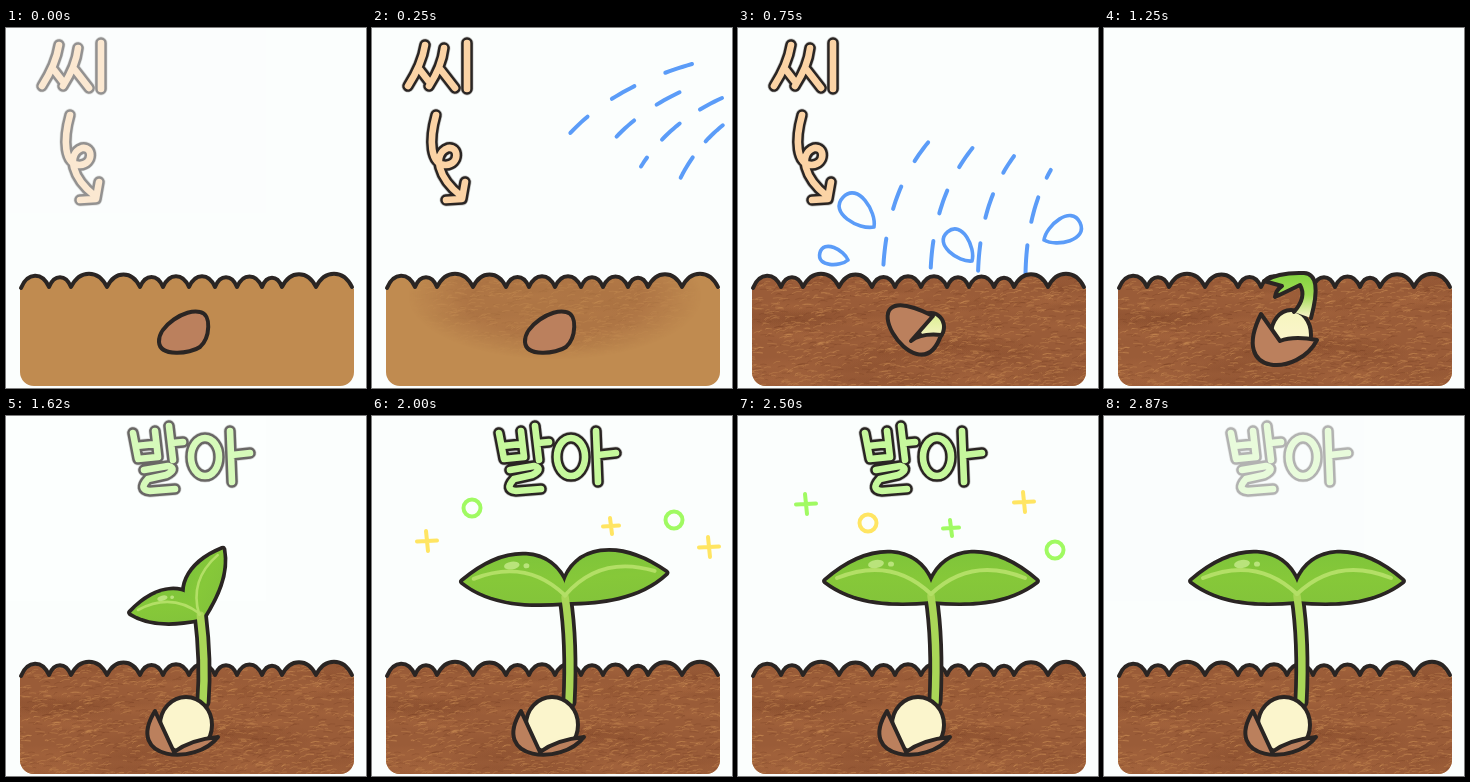
An HTML page with a canvas for the animation above (3 s loop, 360 px wide and 360 px high).

```html
<!DOCTYPE html>
<html lang="ko">
<head>
<meta charset="utf-8">
<title>씨 → 발아</title>
<style>
  html, body { margin: 0; width: 100%; height: 100%; overflow: hidden; background: #fbfefd; }
  canvas { display: block; width: 360px; height: 360px; }
</style>
</head>
<body>
<canvas id="stage" width="360" height="360" role="img" aria-label="씨, 발아"></canvas>
<script>
const INK = '#2a2523', PAPER = '#fbfefd', BLUE = '#5b9cf8', YELLOW = '#ffe562', LIME = '#a0fa62';
const LOOP = 3000, STEP = 125;
const ctx = document.getElementById('stage').getContext('2d');
ctx.lineCap = ctx.lineJoin = 'round';

const clamp = v => Math.max(0, Math.min(1, v));
const lerp = (a, b, k) => a + (b - a) * k;
const rad = degrees => degrees * Math.PI / 180;

function stroke(path, color, width) {
  ctx.strokeStyle = color;
  ctx.lineWidth = width;
  ctx.stroke(path);
}
function paint(path, fill, width = 4) {
  ctx.fillStyle = fill;
  ctx.fill(path);
  stroke(path, INK, width);
}
function vertical(y0, y1, ...colors) {
  const g = ctx.createLinearGradient(0, y0, 0, y1);
  colors.forEach((c, i) => g.addColorStop(i / (colors.length - 1), c));
  return g;
}

// Brush lettering
const seedWord = new Path2D('M53 17Q50 36 36 58M48 42L58 55M72 20Q70 38 57 58M69 42L83 60M95 15V61' +
  'M64 87C57 112 58 137 74 137C88 136 87 118 76 120C60 126 66 150 89 168M93 154L90 171L74 172');
const sproutWord = new Path2D('M127 17L132 43L152 41L149 15M130 30L150 28M163 10L167 44M166 27L177 26' +
  'M138 54L162 50Q172 53 160 59L142 63Q132 74 144 75L169 73' +
  'M213 41A14 19 0 1 1 185 41A14 19 0 1 1 213 41M224 15L226 66M226 39L244 37');

function lettering(path, fill, alpha) {
  if (alpha <= 0) return;
  stroke(path, 'rgba(42,37,35,.25)', 13);
  stroke(path, INK, 11.6);
  stroke(path, fill, 6.6);
  ctx.globalAlpha = 1 - alpha;
  ctx.fillStyle = PAPER;
  ctx.fillRect(0, 0, 260, 185);
  ctx.globalAlpha = 1;
}

// Ground: a row of bumps, the wider the higher
const ridge = new Path2D('M15 260');
let edge = 15;
for (const width of [28, 22, 36, 33, 23, 26, 26, 22, 25, 20, 34, 36]) {
  const top = 259 - (4 + .26 * width) / .75, inset = width * .24;
  ridge.bezierCurveTo(edge + inset, top, edge + width - inset, top, edge += width, 259);
}
const soil = new Path2D(ridge);
soil.lineTo(348, 261);
soil.arcTo(348, 358, 300, 358, 14);
soil.arcTo(14, 358, 14, 300, 14);
soil.lineTo(14, 261);

function layer() {
  const c = document.createElement('canvas');
  c.width = c.height = 360;
  return c.getContext('2d');
}

function makeTexture() {
  const g = layer();
  let seed = 7;
  const rnd = () => (seed = seed * 16807 % 2147483647) / 2147483647;
  g.fillStyle = '#9a5c38';
  g.fillRect(0, 0, 360, 360);
  for (let i = 0; i < 45; i++) {
    const r = 30 + rnd() * 40, glow = g.createRadialGradient(0, 0, 0, 0, 0, r);
    const tone = i % 2 ? '176,110,66' : '128,70,40';
    glow.addColorStop(0, `rgba(${tone},.3)`);
    glow.addColorStop(1, `rgba(${tone},0)`);
    g.setTransform(1, 0, 0, .16, rnd() * 360, 245 + rnd() * 115);
    g.fillStyle = glow;
    g.fillRect(-r, -r, 2 * r, 2 * r);
  }
  g.resetTransform();
  g.lineWidth = .9;
  for (let i = 0; i < 1700; i++) {
    const x = rnd() * 360, y = 245 + rnd() * 115, len = 3 + rnd() * 7, tilt = (rnd() - .7) * 4;
    g.strokeStyle = i % 3 ? 'rgba(205,143,87,.42)' : 'rgba(116,62,35,.3)';
    g.beginPath();
    g.moveTo(x, y);
    g.quadraticCurveTo(x + len / 2, y + tilt - 1, x + len, y + tilt);
    g.stroke();
  }
  return g.canvas;
}
const texture = makeTexture(), damp = layer();

// The texture seen through a soft ellipse that widens as water soaks in.
function soak(wet) {
  damp.globalCompositeOperation = 'copy';
  damp.drawImage(texture, 0, 0);
  damp.globalCompositeOperation = 'destination-in';
  const fade = damp.createRadialGradient(0, 0, 0, 0, 0, 1);
  const core = `rgba(0,0,0,${clamp(wet * 1.4)})`;
  fade.addColorStop(0, core);
  fade.addColorStop(.6, core);
  fade.addColorStop(1, 'rgba(0,0,0,0)');
  damp.setTransform(100 + 140 * wet, 0, 0, 30 + 100 * wet, 183, 268);
  damp.fillStyle = fade;
  damp.fillRect(-9, -9, 18, 18);
  damp.resetTransform();
  return damp.canvas;
}

function ground(wet) {
  ctx.fillStyle = '#c08b50';
  ctx.fill(soil);
  ctx.save();
  ctx.clip(soil);
  ctx.drawImage(wet < 1 ? soak(wet) : texture, 0, 0);
  ctx.restore();
  stroke(ridge, INK, 4);
}

// Water: four nested arcs of dashes flowing down to evenly spaced feet
function streamPoint(k, t) {
  const bend = (a, b, c) => lerp(lerp(a, b, t), lerp(b, c, t), t);
  return [bend(145 + 47.5 * k, 150 + 46.5 * k, 320 + 15 * k), bend(246, 85 + 17 * k, 36 + 17 * k)];
}

function stream(k, step) {
  const length = 306 - 38 * k, period = 58 - 3 * k;
  const head = clamp(1 - step / 4), tail = clamp(1 - (step - 5) * .44);
  const flow = 24.5 * (4 - step) % period;
  for (let s = flow - period; s < length + period; s += period) {
    const from = Math.max(head, s / length), to = Math.min(tail, (s + 26) / length);
    if (from >= to) continue;
    const dash = new Path2D();
    for (let j = 0; j <= 6; j++) dash.lineTo(...streamPoint(k, lerp(from, to, j / 6)));
    stroke(dash, BLUE, 4);
  }
}

const drops = [
  { x: 136, y: 203, lean: 52, size: 43, side: -1 },
  { x: 110, y: 236, lean: 22, size: 29, side: -1 },
  { x: 205, y: 236, lean: 50, size: 38, side: 1 },
  { x: 306, y: 216, lean: 34, size: 40, side: 1 }
];

function drop({ x, y, lean, size, side }) {
  const p = new Path2D('M0 0C.2 -.3 1 -.5 1 0C1 .5 .2 .3 0 0');
  ctx.save();
  ctx.translate(x, y);
  ctx.scale(side * size, size);
  ctx.rotate(rad(-lean));
  stroke(p, BLUE, 3.6 / size);
  ctx.restore();
}

function water(step) {
  if (step < 1 || step > 7) return;
  for (let k = 0; k < 4; k++) stream(k, step);
  if (step < 3 || step > 6) return;
  const second = step > 4;
  drops.forEach((d, i) => drop(second && i === 2
    ? { ...d, x: d.x + 29, y: d.y - 3, side: -1 }
    : { ...d, y: d.y - (second ? 4 : 0), lean: d.lean - (second ? 8 : 0) }));
}

// Seed poses: cracked, split, fallen apart.
// egg: centre and radii; shell: upper lip, mouth, lower lip and the two handles of its back.
const poses = [
  { egg: [193, 299, 13, 14], shell: [195, 288, 173, 313, 203, 307, 180, 375, 100, 240] },
  { egg: [187, 307, 20, 25], shell: [157, 286, 176, 313, 213, 312, 195, 348, 125, 350] },
  { egg: [180, 309, 26, 28], shell: [149, 295, 168, 336, 212, 321, 190, 350, 118, 345] }
];
const wholeSeed = new Path2D('M153 314C152 298 180 280 194 284C206 286 204 310 194 319C184 326 154 329 153 314Z');
const hook = new Path2D('M190 284Q203 269 196 257Q186 262 171 269Q172 262 178 258L160 253Q175 244 200 245Q219 246 207 290');

function blend(name, k) {
  const i = k < 1 ? 0 : 1;
  return poses[i][name].map((v, j) => lerp(v, poses[i + 1][name][j], k - i));
}

function egg(k, fill) {
  const [x, y, rx, ry] = blend('egg', k), p = new Path2D();
  p.ellipse(x, y, rx, ry, 0, 0, 7);
  paint(p, fill);
}

function shell(k) {
  const [lx, ly, mx, my, rx, ry, ...handles] = blend('shell', k), p = new Path2D();
  p.moveTo(lx, ly);
  p.lineTo(mx, my);
  p.quadraticCurveTo((mx + rx) / 2 - 5, (my + ry) / 2 - 5, rx, ry);
  p.bezierCurveTo(...handles, lx, ly);
  p.closePath();
  paint(p, '#bb805d');
}

function germinating(k) {
  egg(k, vertical(284, 314, k ? '#f6f5bf' : '#d9ef8e', '#fbf5cc'));
  if (k) {
    ctx.save();
    ctx.translate(199, 287);
    ctx.scale(k, k);
    ctx.translate(-199, -287);
    paint(hook, vertical(246, 288, '#83d33f', '#9fdc55', '#f7f2c4'), 4 / k);
    ctx.restore();
  }
  shell(k);
}

// One leaf around the joint; the other is its mirror image.
const leaf = new Path2D('M0 -13C14 -50 60 -54 105 -15C75 8 35 8 0 5Z');
const rib = new Path2D('M0 -2Q40 -40 94 -18');

function plant(k) {
  const ease = 1 - (1 - k) ** 1.9, fold = 70 * (1 - k) ** 1.6;
  const x = 193 + 4 * (1 - ease), y = 180 + 56 * (1 - ease);
  const stem = new Path2D();
  stem.moveTo(x, y);
  stem.quadraticCurveTo(200, y + 45, 197, 286);

  const leaves = draw => [1, -1].forEach(side => {
    ctx.save();
    ctx.translate(x, y);
    ctx.rotate(rad(-100 * (1 - ease)));
    ctx.scale(side * ease, ease);
    ctx.rotate(rad(-fold));
    draw(side);
    ctx.restore();
  });

  stroke(stem, INK, 15);
  leaves(() => stroke(leaf, INK, 7.5 / ease));
  leaves(side => {
    ctx.fillStyle = vertical(-42, 8, '#7fc53a', '#86c839', '#83c43a');
    ctx.fill(leaf);
    if (side > 0) return;
    ctx.fillStyle = '#b9e37b';
    ctx.beginPath();
    ctx.ellipse(55, -32, 8, 4, .15, 0, 7);
    ctx.ellipse(40, -32, 3, 2.6, 0, 0, 7);
    ctx.fill();
  });
  stroke(stem, '#a9d657', 7.5);
  leaves(() => stroke(rib, '#b3df66', 4));

  const apart = 1 + clamp(k * 7 / 3);
  egg(apart, '#fbf5cc');
  shell(apart);
}

// Sparkles: colours alternate along the row; the third row mirrors the first.
const rows = [
  { kinds: '+o+o+', spots: [[55, 125], [100, 92], [239, 110], [302, 104], [337, 131]] },
  { kinds: '+o++o', spots: [[68, 88], [130, 107], [213, 112], [286, 86], [317, 134]] }
];
rows.push({ ...rows[0], spots: rows[0].spots.map(([x, y]) => [379 - x, y]) });

function sparkle(kind, x, y, r, color) {
  const p = new Path2D();
  if (kind === 'o') p.arc(x, y, r - 1.5, 0, 7);
  else {
    p.moveTo(x - r, y + .5);
    p.lineTo(x + r, y - .5);
    p.moveTo(x - 1, y - r);
    p.lineTo(x + 1, y + r);
  }
  stroke(p, color, 4);
}

function sparkles(phase) {
  const { kinds, spots } = rows[phase];
  spots.forEach(([x, y], i) =>
    sparkle(kinds[i], x, y, i === 2 ? 8 : 10, (i + phase) % 2 ? LIME : YELLOW));
}

function draw(time) {
  const step = Math.min(23, Math.floor((time % LOOP + 5) / STEP));
  ctx.fillStyle = PAPER;
  ctx.fillRect(0, 0, 360, 360);
  lettering(seedWord, '#fbd3a5', clamp(Math.min(step + 1, 9 - step) * .5));
  lettering(sproutWord, '#c6f89c', clamp(Math.min(step - 11, 24 - step) * .35));
  water(step);
  ground(clamp(step / 6));
  if (step < 6) paint(wholeSeed, '#bb805d');
  else if (step < 11) germinating((step - 6) / 4);
  else plant(clamp((step - 10) / 7));
  if (step > 15 && step < 23) sparkles((step - 16) % 3);
}

const start = performance.now();
function tick() {
  draw(performance.now() - start);
  requestAnimationFrame(tick);
}
tick();
</script>
</body>
</html>
```
